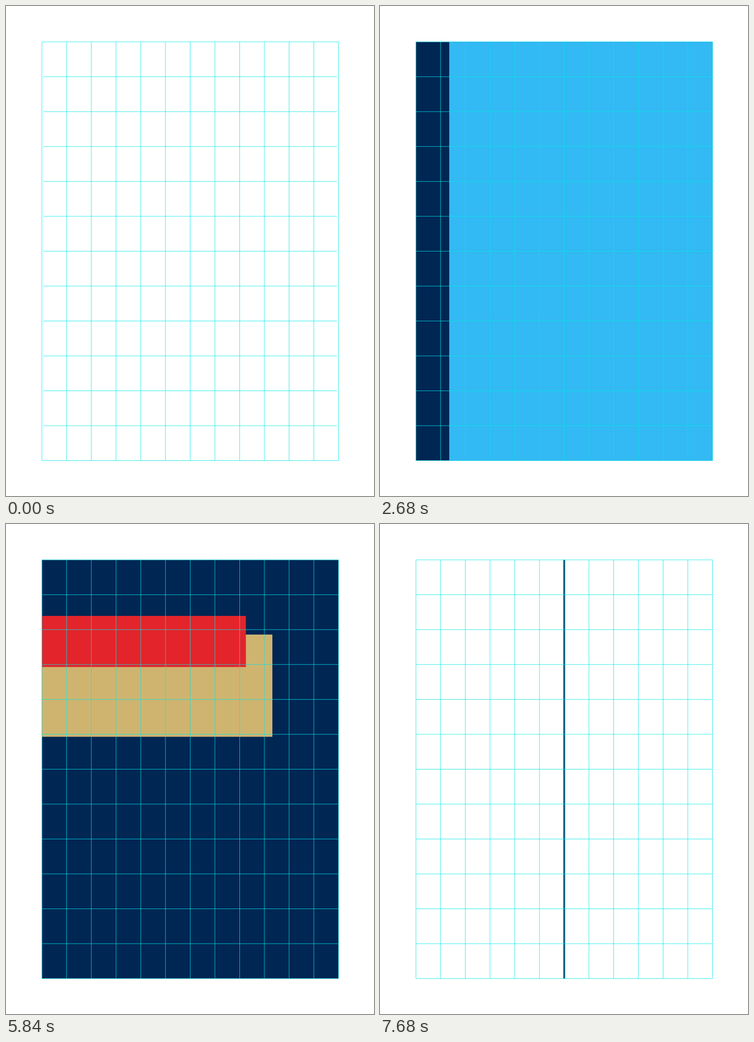
Animation of 648 by 864 pixels, one loop 7720 ms. Source, as an HTML page with a canvas:

```html
<!DOCTYPE html>
<html lang="en">
<head>
<meta charset="utf-8">
<title>Grid blocks</title>
<style>
  html, body { margin: 0; width: 648px; height: 864px; overflow: hidden; background: #fff; }
  canvas { display: block; }
</style>
</head>
<body>
<canvas id="stage" width="648" height="864"></canvas>
<script>
const ctx = document.getElementById('stage').getContext('2d');
const LOOP = 7720, CELLS = 12;
const LEFT = 63.2, TOP = 63.2, COL = 43.53, ROW = 61.53;
const NAVY = '#002654', SKY = '#33b9f3', SAND = '#cfb470', RED = '#e3242b';
const LINE = 'rgba(0, 232, 232, 0.72)';

const gridX = c => LEFT + c * COL;
const gridY = r => TOP + r * ROW;
const mix = (a, b, k) => a + (b - a) * k;

// Cubic Bezier easing, solved by bisection
function bezier(x1, y1, x2, y2) {
  const at = (a, b, s) => 3 * (1 - s) ** 2 * s * a + 3 * (1 - s) * s * s * b + s ** 3;
  return x => {
    if (x <= 0) return 0;
    if (x >= 1) return 1;
    let lo = 0, hi = 1;
    for (let i = 0; i < 24; i++) {
      const mid = (lo + hi) / 2;
      if (at(x1, x2, mid) < x) lo = mid; else hi = mid;
    }
    return at(y1, y2, lo);
  };
}
const ease = bezier(0.25, 0.1, 0.25, 1);
const easeInOut = bezier(0.42, 0, 0.58, 1);

// Fills a block given in grid cells
function block(color, c0, r0, c1, r1, alpha = 1) {
  if (c1 <= c0 || r1 <= r0 || alpha <= 0) return;
  ctx.globalAlpha = alpha;
  ctx.fillStyle = color;
  ctx.fillRect(gridX(c0), gridY(r0), (c1 - c0) * COL, (r1 - r0) * ROW);
  ctx.globalAlpha = 1;
}

function grid(inset) {
  ctx.strokeStyle = LINE;
  ctx.lineWidth = 1;
  ctx.beginPath();
  for (let i = 0; i <= CELLS; i++) {
    const gap = i % CELLS ? inset : 0;
    ctx.moveTo(gridX(i), gridY(0));
    ctx.lineTo(gridX(i), gridY(CELLS));
    ctx.moveTo(gridX(0) + gap, gridY(i));
    ctx.lineTo(gridX(CELLS) - gap, gridY(i));
  }
  ctx.stroke();
}

function draw(t) {
  const step = (start, length, curve = ease) => curve((t - start) / length);
  const open = step(45, 1000);
  const skyRight = step(1042, 1000);
  const skyLeft = step(2207, 1000);
  const sandUp = step(3178, 1000);
  const redUp = step(4334, 1047);
  const fade = step(4334, 1047, easeInOut);
  const move = step(5515, 1047);
  const drop = step(6727, 1010);
  const close = step(6727, 1010, easeInOut);

  ctx.fillStyle = '#fff';
  ctx.fillRect(0, 0, 648, 864);

  const half = 6 * open * (1 - close);
  block(NAVY, 6 - half, 0, 6 + half, 12);
  block(SKY, 6 - 6 * skyLeft, 0, 6 + 6 * skyRight, 12, 1 - fade);

  const sandBottom = mix(4, 6, move);
  const sandTop = mix(mix(4, 0, sandUp), 4, move);
  block(SAND, 0, mix(sandTop, sandBottom, drop), mix(12, 7, move), sandBottom);

  const redBottom = mix(2, 4, move);
  const redTop = mix(mix(2, 0, redUp), 3, move);
  block(RED, 0, mix(redTop, redBottom, drop), mix(12, 5, move), redBottom);

  grid(t < 40 ? 2.8 : 0);
}

const begin = performance.now();
function tick() {
  draw((performance.now() - begin) % LOOP);
  requestAnimationFrame(tick);
}
tick();
</script>
</body>
</html>
```
